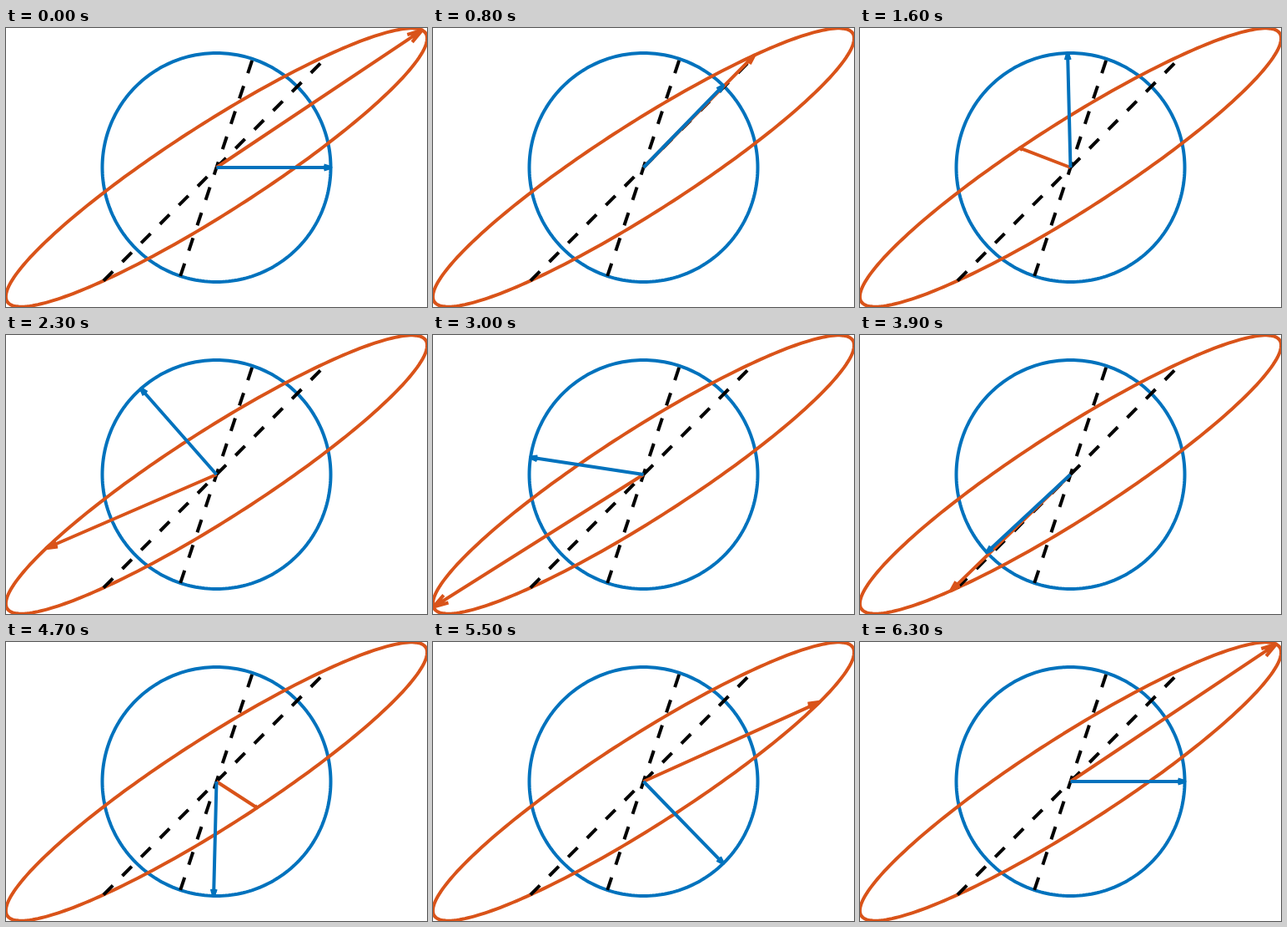
These frames come from a looping animation (505 by 334 pixels, 6.4 s). An HTML page:

```html
<!DOCTYPE html>
<html lang="en">
<head>
<meta charset="utf-8">
<title>Linear map of the unit circle</title>
<style>
  html, body { margin: 0; width: 100%; height: 100%; overflow: hidden; background: #fff; }
  svg { display: block; width: 505px; height: 334px; }
  path { fill: none; stroke-width: 4; stroke-linejoin: round; }
  .blue { stroke: #0072bd; }
  .orange { stroke: #d95319; }
  .axis { stroke: #000; stroke-dasharray: 16 16; }
</style>
</head>
<body>
<svg viewBox="0 0 505 334">
  <path id="circle" class="blue"/>
  <path id="ellipse" class="orange"/>
  <path id="major" class="axis"/>
  <path id="minor" class="axis"/>
  <path id="image" class="orange"/>
  <path id="vector" class="blue"/>
</svg>
<script>
  const CX = 252.5, CY = 167, UNIT = 137;
  const STEPS = 64, STEP_MS = 100;
  const HEAD = 0.06, SPREAD = 0.3;

  const unit = a => [Math.cos(a), Math.sin(a)];
  const map = ([x, y]) => [1.8 * x - 0.4 * y, 1.2 * x + 0.2 * y];
  const point = ([x, y]) => (CX + UNIT * x).toFixed(2) + ' ' + (CY - UNIT * y).toFixed(2);
  const line = pts => 'M' + pts.map(point).join('L');
  const draw = (id, d) => document.getElementById(id).setAttribute('d', d);

  function arrow([x, y]) {
    const barb = s => [x - HEAD * (x + s * SPREAD * y), y - HEAD * (y - s * SPREAD * x)];
    return line([[0, 0], [x, y]]) + line([barb(1), [x, y], barb(-1)]);
  }

  // Eigenvector (x, y) scaled to the given length, through the centre
  function axis(x, y, length) {
    const k = length / Math.hypot(x, y);
    return line([[-x * k, -y * k], [x * k, y * k]]);
  }

  const ring = Array.from({ length: 240 }, (_, i) => unit(i * Math.PI / 120));
  draw('circle', line(ring) + 'Z');
  draw('ellipse', line(ring.map(map)) + 'Z');
  draw('major', axis(1, 1, 1.4));
  draw('minor', axis(1, 3, 1));

  function render(ms) {
    const step = Math.floor(ms / STEP_MS) % STEPS;
    const v = unit(2 * Math.PI * step / (STEPS - 1));
    draw('vector', arrow(v));
    draw('image', arrow(map(v)));
  }

  const start = performance.now();
  function tick() {
    render(performance.now() - start);
    requestAnimationFrame(tick);
  }
  tick();
</script>
</body>
</html>
```
